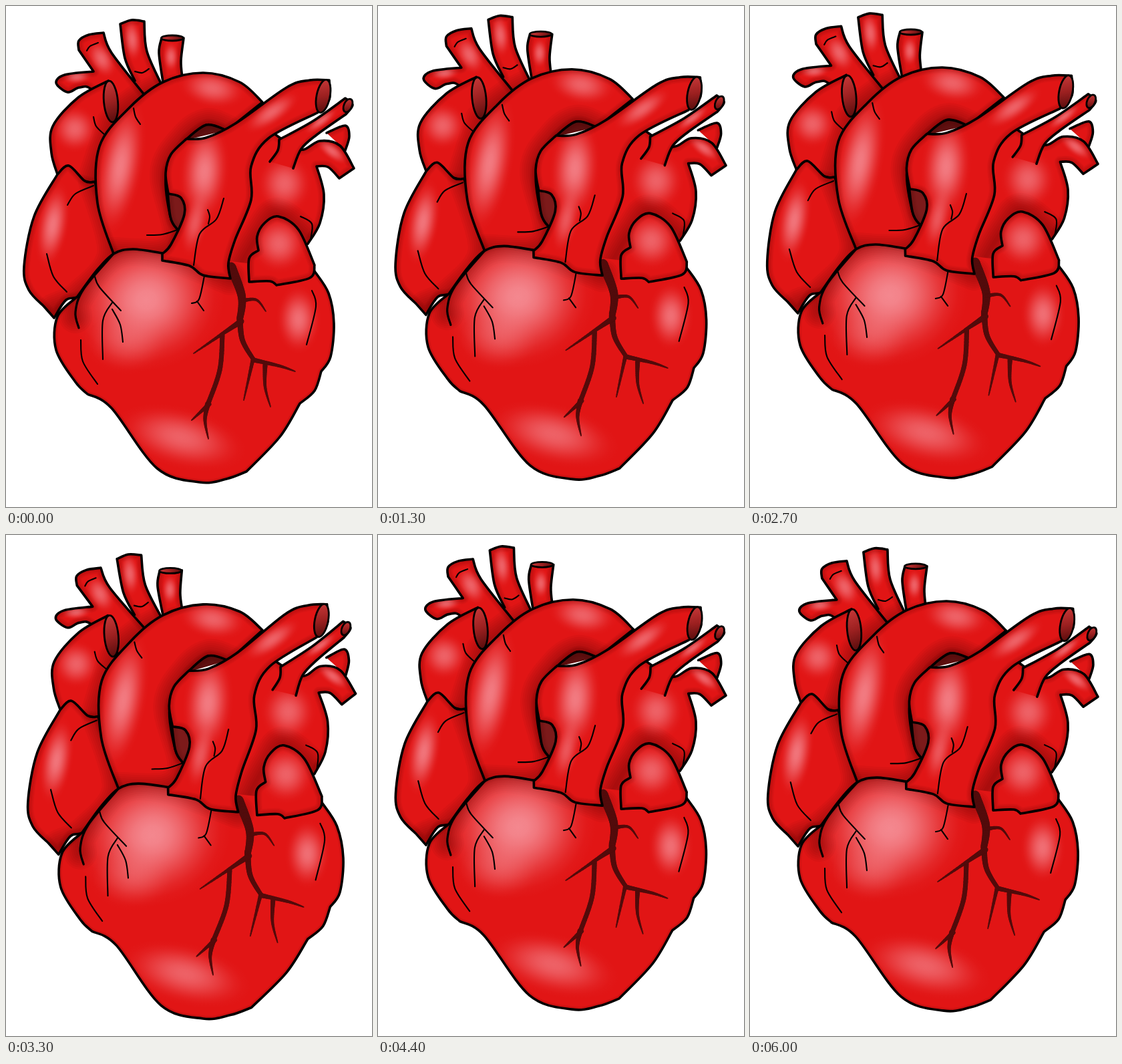
Recreate the animation shown at these times as an HTML page with a canvas. Size 548 by 750 pixels, loop 6100 ms.

```html
<!DOCTYPE html>
<html lang="en">
<head>
<meta charset="utf-8">
<title>Beating heart</title>
<style>
html, body { margin: 0; width: 100%; height: 100%; overflow: hidden; background: #fff; }
canvas { display: block; }
</style>
</head>
<body>
<canvas id="stage" width="548" height="750"></canvas>
<script>
const ctx = document.getElementById('stage').getContext('2d');
const LOOP = 6100, STEP = 100, BEAT = 1510;
const RED = '#e11515', DARK = '#520b0b';

// Pins: rest x, y, then offsets (dx, dy) in four poses of the beat.
const pins = [
  [171, 27, -5, 9, -12, 9, -16, -3, -9, -10],
  [68, 200, 3, 10, -2, 11, -11, 3, -10, -7],
  [30, 395, 6, 11, 7, 11, 3, 2, -1, -7],
  [300, 713, 5, 11, 9, 11, 9, 0, 2, -7],
  [492, 495, 15, 10, 21, 8, 12, 0, 1, -8],
  [505, 160, -3, -9, -4, -13, -5, -13, -1, -6],
  [406, 315, 9, 0, 11, -4, 6, -8, 0, -7],
  [295, 100, 0, 4, 0, 2, -5, -5, -7, -8],
  [335, 408, 12, 7, 16, 6, 8, -3, 0, -7]
];

// Keys: phase of the beat, then the share of each pose (0 where left out).
const keys = [
  [0], [.19, 1], [.3, .75, .72, -.25], [.38, 0, 1],
  [.525, 0, 0, 1], [.68, 0, -.35, .85, .75], [.79, 0, 0, 0, 1], [1]
];

// Radial basis with an affine part spreads the pin offsets over the drawing.
const basis = (x, y) => [...pins.map(p => Math.hypot(x - p[0], y - p[1])), 1, x, y];

function solve(rows) {
  const n = rows.length;
  for (let i = 0; i < n; i++) {
    let best = i;
    for (let r = i + 1; r < n; r++) if (Math.abs(rows[r][i]) > Math.abs(rows[best][i])) best = r;
    [rows[i], rows[best]] = [rows[best], rows[i]];
    const pivot = rows[i][i];
    rows[i] = rows[i].map(v => v / pivot);
    for (let r = 0; r < n; r++) {
      if (r === i) continue;
      const k = rows[r][i];
      rows[r] = rows[r].map((v, c) => v - k * rows[i][c]);
    }
  }
  return rows.map(r => r.slice(n));
}

const field = solve([
  ...pins.map(p => [...basis(p[0], p[1]), ...p.slice(2)]),
  ...[p => 1, p => p[0], p => p[1]].map(f => [...pins.map(f), ...Array(11).fill(0)])
]);

let shares;
function setPhase(phase) {
  const i = keys.findIndex(k => k[0] > phase);
  const a = keys[i - 1], b = keys[i];
  const u = (phase - a[0]) / (b[0] - a[0]);
  shares = [1, 2, 3, 4].map(k => (a[k] || 0) * (1 - u) + (b[k] || 0) * u);
}

const restOffsets = new Map();
function warp([x, y]) {
  const id = x + ' ' + y;
  if (!restOffsets.has(id)) {
    const sums = Array(8).fill(0);
    basis(x, y).forEach((b, i) => field[i].forEach((c, k) => { sums[k] += b * c; }));
    restOffsets.set(id, sums);
  }
  const d = restOffsets.get(id);
  shares.forEach((s, k) => { x += s * d[2 * k]; y += s * d[2 * k + 1]; });
  return [x, y];
}

// "x y x y / x y": smooth runs of points, with a corner at each slash.
function curvesOf(text) {
  let last;
  return text.split('/').flatMap(part => {
    const p = last ? [last] : [];
    part.match(/\d+ \d+/g).forEach(pair => p.push(warp(pair.split(' ').map(Number))));
    last = p[p.length - 1];
    return p.slice(1).map((b, i) => {
      const a = p[i], before = p[i - 1] || a, after = p[i + 2] || b;
      const c1 = a.map((v, k) => v + (b[k] - before[k]) / 6);
      const c2 = b.map((v, k) => v - (after[k] - a[k]) / 6);
      return [a, c1, c2, b];
    });
  });
}

function pathOf(text) {
  const path = new Path2D();
  curvesOf(text).forEach(([a, c1, c2, b], i) => {
    if (!i) path.moveTo(...a);
    path.bezierCurveTo(...c1, ...c2, ...b);
  });
  return path;
}

function line(text, width = 2.1) {
  ctx.strokeStyle = '#000';
  ctx.lineWidth = width;
  ctx.stroke(pathOf(text));
}

function shadow(path, reach, strength) {
  ctx.strokeStyle = `rgba(80,0,0,${strength})`;
  for (let k = 1; k <= 8; k++) {
    ctx.lineWidth = reach * k / 4;
    ctx.stroke(path);
  }
}

function glow([x, y, rx, ry, turn = 0, alpha = .6]) {
  const g = ctx.createRadialGradient(0, 0, 0, 0, 0, 1);
  for (let r = 0; r <= 1; r += .125) {
    g.addColorStop(r, `rgba(246,148,156,${alpha * (1 + Math.cos(Math.PI * r)) / 2})`);
  }
  ctx.save();
  ctx.translate(...warp([x, y]));
  ctx.rotate(turn);
  ctx.scale(rx, ry);
  ctx.fillStyle = g;
  ctx.fillRect(-1, -1, 2, 2);
  ctx.restore();
}

// Fills, shades the rim and an optional deeper edge, adds glows, then outlines.
function shape(text, { edge, rim = 9, glows = [], fill = RED } = {}) {
  const path = pathOf(text);
  ctx.fillStyle = fill;
  ctx.fill(path);
  ctx.save();
  ctx.clip(path);
  shadow(path, rim, .04);
  if (edge) shadow(pathOf(edge), 25, .055);
  glows.forEach(glow);
  ctx.restore();
  line(text, 3.6);
}

function mouth(x, y, rx, ry, turn) {
  ctx.save();
  ctx.translate(...warp([x, y]));
  ctx.rotate(turn);
  const g = ctx.createLinearGradient(-rx, -ry, rx, ry);
  ['#c93a3a', '#9c2020', DARK].forEach((c, i) => g.addColorStop(i / 2, c));
  ctx.beginPath();
  ctx.ellipse(0, 0, rx, ry, 0, 0, Math.PI * 2);
  ctx.fillStyle = g;
  ctx.fill();
  ctx.strokeStyle = '#000';
  ctx.lineWidth = 2.8;
  ctx.stroke();
  ctx.restore();
}

function vein(text, from, to = 1.5) {
  const curves = curvesOf(text), parts = 12, total = curves.length * parts;
  ctx.strokeStyle = DARK;
  curves.forEach(([a, c1, c2, b], i) => {
    const at = u => a.map((v, k) => (1 - u) ** 3 * v + 3 * u * (1 - u) ** 2 * c1[k]
      + 3 * u * u * (1 - u) * c2[k] + u ** 3 * b[k]);
    for (let j = 0; j < parts; j++) {
      ctx.lineWidth = from + (to - from) * (i * parts + j) / total;
      ctx.beginPath();
      ctx.moveTo(...at(j / parts));
      ctx.lineTo(...at((j + 1) / parts));
      ctx.stroke();
    }
  });
}

function upperVessels() {
  shape('233 48 229 70 235 114 / 264 108 / 262 82 266 48', { glows: [[247, 76, 13, 24]] });
  mouth(249, 48, 16.5, 4, 0);
  shape('193 112 178 78 171 27 / 188 21 207 23 / 211 68 235 122 / 207 136', {
    edge: '207 136 235 122', glows: [[189, 50, 15, 34, -.1]]
  });
  line('193 98 204 100 214 94');
  shape('165 175 / 129 126 110 122 92 129 75 115 88 103 131 98 / 109 66 / 109 52 124 43 146 40 / 158 70 208 134', {
    edge: '165 165 208 134', glows: [[143, 79, 20, 32, -.5], [106, 106, 24, 12, -.1]]
  });
  line('121 67 126 60 138 55');
  shape('153 112 108 137 70 180 68 220 77 252 / 150 270 / 166 174 / 153 112', {
    edge: '130 265 160 175', glows: [[103, 184, 36, 36]]
  });
  mouth(157, 143, 10.5, 31, -.09);
  line('131 166 135 180 148 193');
}

function leftAtrium() {
  shape('77 252 94 239 118 262 133 263 / 175 400 / 112 434 90 440 72 467 / 57 450 / ' +
    '34 425 27 390 42 315 77 252', {
    edge: '133 263 161 371 112 434 72 455', glows: [[70, 328, 25, 66, .17, .75]]
  });
  line('61 371 71 405 91 428');
  line('92 298 104 281 131 269');
}

function rightVessels() {
  shape('480 190 508 179 514 195 508 216');
  shape('350 225 / 400 190 / 440 215 470 202 500 209 521 243 / 499 258 / 482 241 465 240 / ' +
    '476 282 470 325 452 356 / 320 420 / 350 225', {
    edge: '352 385 380 340 406 312 450 345', glows: [[417, 266, 42, 46], [488, 217, 30, 13, .65]]
  });
  shape('395 233 407 216 409 200 / 460 172 508 138 / 519 148 509 162 / 465 193 442 214 430 243', {
    rim: 6, glows: [[472, 172, 32, 10, -.65]]
  });
  mouth(512, 149, 6, 10.5, .42);
  line('441 315 458 326 456 350');
}

function aorticArch() {
  shape('161 371 137 295 140 210 185 152 235 114 295 100 350 114 384 144 / 330 187 / 300 178 270 200 / ' +
    '240 250 246 315 258 336 / 240 385 / 166 385 / 161 371', {
    edge: '330 187 300 178 268 200 240 250 258 336 234 371 161 371',
    glows: [[171, 240, 35, 105, .18, .8], [309, 123, 52, 30, .18]]
  });
  line('191 153 194 166 201 177');
  line('211 343 234 342 257 335');
  shape('268 201 300 178 330 186', { fill: '#5f1010' });
  shape('240 250 246 315 258 336 / 280 310 / 255 265', { fill: '#7c1a1a' });
}

function ventricles() {
  shape('462 397 483 430 491 475 486 525 472 547 / 462 576 440 595 / 410 645 360 697 / ' +
    '330 708 290 713 226 692 158 602 122 581 / 104 563 75 515 77 465 107 435 / ' +
    '135 397 161 371 190 364 234 370', {
    rim: 5, edge: '104 465 107 435 161 371 234 370 336 408',
    glows: [[210, 440, 118, 106, -.25, .9], [180, 502, 65, 50, 0, .35],
      [262, 646, 100, 46, .25], [438, 469, 34, 52, 0, .7]]
  });
  line('161 371 116 424 104 458 109 482', 3.2);
  line('112 500 115 532 137 566');
  line('133 405 140 421 172 456');
  line('159 444 145 471 145 529');
  line('159 454 171 477 175 503');
  line('297 404 289 439 278 445');
  line('286 442 296 456');
  line('458 426 464 450 450 507');
  vein('337 391 353 435 350 470', 15, 9);
  vein('350 465 354 500 371 530', 9, 6);
  vein('371 530 410 539 433 547', 7);
  vein('352 472 325 490 281 520', 9);
  vein('324 492 320 545 302 597', 7, 7);
  vein('302 596 298 620 303 648', 8);
  vein('304 596 278 620', 7);
  vein('354 441 375 440 389 457', 6);
  vein('370 528 356 590', 6);
  vein('388 537 388 570 396 600', 7);
}

function auricle() {
  shape('364 413 364 378 378 366 / 376 345 387 325 408 315 438 335 462 388 / 455 407 405 418 / 395 412 364 413', {
    glows: [[409, 356, 43, 44]]
  });
}

function pulmonaryTrunk() {
  shape('234 381 / 234 371 / 247 357 267 312 262 287 243 281 / 239 250 247 222 270 199 / ' +
    '300 197 345 175 420 122 455 111 484 111 / 484 140 466 160 / ' +
    '393 198 367 240 367 290 343 350 333 385 336 408 / 295 403 275 389 234 381', {
    glows: [[297, 248, 38, 78, .08, .8], [283, 325, 20, 52, .22, .5], [398, 159, 50, 19, -.6]]
  });
  mouth(475, 135, 10, 25, .2);
  line('326 288 315 319 290 341 281 388');
  line('302 305 305 315 303 326');
}

function draw() {
  ctx.fillStyle = '#fff';
  ctx.fillRect(0, 0, 548, 750);
  ctx.lineCap = ctx.lineJoin = 'round';
  upperVessels();
  leftAtrium();
  rightVessels();
  aorticArch();
  ventricles();
  auricle();
  pulmonaryTrunk();
}

let shown = -1;
function tick() {
  const step = Math.floor(performance.now() % LOOP / STEP);
  if (step !== shown) {
    shown = step;
    setPhase(step * STEP / BEAT % 1);
    draw();
  }
  requestAnimationFrame(tick);
}
tick();
</script>
</body>
</html>
```
